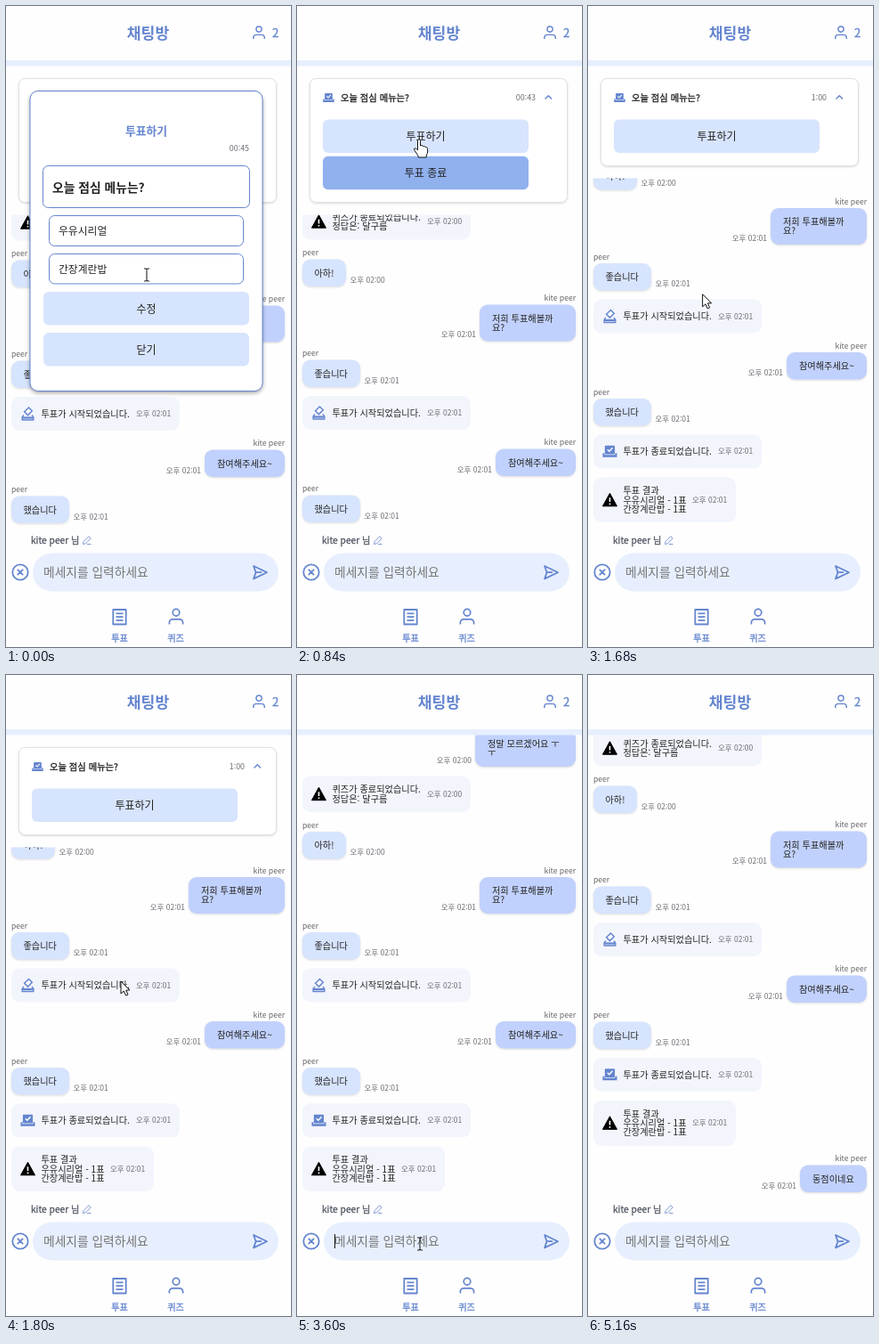
Write an HTML page that moves like this. It is 320 px wide and 720 px high and loops after 5.4 s.

```html
<!DOCTYPE html>
<html lang="ko">
<head>
<meta charset="utf-8">
<title>채팅방</title>
<style>
html, body { margin: 0; width: 100%; height: 100%; overflow: hidden; background: #fefefe; }
svg { display: block; width: 100vw; height: 100vh; font-family: "Noto Sans CJK KR", "Noto Sans CJK", "Noto Sans", sans-serif; }
.line { fill: none; stroke: #6485cf; stroke-width: 1.8; stroke-linejoin: round; }
.soft { filter: drop-shadow(0 1.5px 1px #0002); }
.lift { filter: drop-shadow(0 2px 2px #0005); }
</style>
</head>
<body>
<svg id="stage" viewBox="0 0 320 720"></svg>
<script>
const LOOP = 5400, STEP = 120;
const CLOSE = 480, END = 1320, HIDE = 2160, FOCUS = 3120, TYPE = 3780, SEND = 4140;
const BLUE = '#6485cf', PALE = '#d7e4fd', MID = '#90b0ee', MINE = '#c1d1fd', NOTE = '#f3f5fc', BAR = '#e7effe';
const INK = '#222', GREY = '#6c6c74';
const QUESTION = '오늘 점심 메뉴는?', REPLY = '동점이네요', ME = 'kite peer', PEER = 'peer';

// y is the vertical centre of the line; medium weight is thickened with a thin stroke
const text = (s, x, y, size, color = INK, anchor = 'start', weight = 400) =>
  `<text x="${x}" y="${y + size * .37}" font-size="${size}" fill="${color}" text-anchor="${anchor}" ` +
  (weight === 500 ? `stroke="${color}" stroke-width=".3"` : `font-weight="${weight}"`) + `>${s}</text>`;
const box = (x, y, r, b, radius, fill, extra = '') =>
  `<rect x="${x}" y="${y}" width="${r - x}" height="${b - y}" rx="${radius}" fill="${fill}" ${extra}/>`;
const outline = (x, y, r, b) => box(x, y, r, b, 6, '#fff', `stroke="${BLUE}"`);
const path = (d, extra = 'class="line"') => `<path d="${d}" ${extra}/>`;
const at = (x, y, body, scale = 1) => `<g transform="translate(${x} ${y}) scale(${scale})">${body}</g>`;
const button = (label, x, y, r, fill = PALE) =>
  box(x, y, r, y + 37.5, 6, fill) + text(label, (x + r) / 2, y + 19.3, 12, INK, 'middle');

const person = path('M8 9V7a4 4 0 0 0-4-4H-4a4 4 0 0 0-4 4v2M4-5a4 4 0 1 1-8 0a4 4 0 0 1 8 0z');
const icons = {
  open: path('M-4.5 1.5L-6.4 4V7H6.4V4L4.5 1.5', 'class="line" style="stroke-width:1.3"') +
    box(-6.4, 3.4, 6.4, 5.6, 0, BLUE) +
    path('M1-7L4.8-3.2L0 1.6L-3.8-2.2z', `fill="#fff" stroke="${BLUE}" stroke-width="1.5"`),
  done: path('M-8 2h2v2H6V2h2v4.5H-8z', `fill="${BLUE}"`) + box(-5.6, -6.5, 5.6, 3.2, 1, BLUE) +
    path('M-2.7-2L-.6 0L3-4', 'fill="none" stroke="#fff" stroke-width="1.4"'),
  warn: path('M0-7.5L8 7H-8z', 'stroke="#000" stroke-linejoin="round"') +
    path('M0-2.5V2.2M0 3.7V5.4', 'stroke="#fff" stroke-width="1.6"')
};

// kind, top, inner edge, time, lines, icon
const messages = [
  ['me', 62, 200, '02:00', ['정말 모르겠어요 ㅜ', 'ㅜ']],
  ['note', 113.5, 195, '02:00', ['퀴즈가 종료되었습니다.', '정답은: 달구름'], 'warn'],
  ['peer', 176, 55, '02:00', ['아하!']],
  ['me', 227, 205, '02:01', ['저희 투표해볼까', '요?']],
  ['peer', 289, 71, '02:01', ['좋습니다']],
  ['note', 329.5, 195, '02:01', ['투표가 시작되었습니다.'], 'open'],
  ['me', 389, 223, '02:01', ['참여해주세요~']],
  ['peer', 441, 71, '02:01', ['했습니다']],
  ['note', 481.3, 195, '02:01', ['투표가 종료되었습니다.'], 'done'],
  ['note', 529.5, 166, '02:01', ['투표 결과', '우유시리얼 - 1표', '간장계란밥 - 1표'], 'warn'],
  ['me', 602, 238, '02:01', [REPLY]]
];

function message([kind, y, edge, time, lines, icon]) {
  const me = kind === 'me', note = kind === 'note', n = lines.length;
  const h = note ? Math.max(38, 20 + 10.2 * n) : 30.5 + 10.4 * (n - 1);
  const mid = y + h / 2;
  const stamp = (x, cy, anchor) => text('오후 ' + time, x, cy, 8.5, GREY, anchor);
  const body = lines.map((s, i) =>
    text(s, note ? 39.5 : me ? edge + 14 : 19.5, mid + (i - (n - 1) / 2) * 10.3, 10.2)).join('');
  if (note) return box(6, y, edge, y + h, 9, NOTE) + at(24.5, mid, icons[icon]) + body + stamp(edge - 49, mid);
  return text(me ? ME : PEER, me ? 313 : 6, y - 7.5, 8.6, '#666', me ? 'end' : 'start') +
    box(me ? edge : 6, y, me ? 313 : edge, y + h, 9, me ? MINE : PALE, 'class="soft"') + body +
    stamp(me ? edge - 4 : edge + 4.5, y + h - 7.5, me ? 'end' : 'start');
}

const ease = (t, start, length) => {
  const p = Math.min(1, Math.max(0, (t - start) / length));
  return p * p * (3 - 2 * p);
};

function chat(t) {
  const top = t < END ? 234.5 : t < HIDE ? 193.5 : 67;
  const shift = (t < CLOSE ? 1 : 0) + 108.5 * (1 - ease(t, END - 60, 200)) - 51.5 * ease(t, SEND, 170);
  const shown = messages.slice(0, t < END ? 8 : t < SEND ? 10 : 11);
  return `<clipPath id="view"><rect y="${top}" width="320" height="${586 - top}"/></clipPath>` +
    `<g clip-path="url(#view)">${at(0, shift, shown.map(message).join(''))}</g>`;
}

function panel(t) {
  if (t >= HIDE) return '';
  const ended = t >= END;
  const clock = ended ? '1:00' : '00:' + (45 - Math.floor(t / 360));
  return box(14.5, 81.5, 303.5, ended ? 179.5 : 220.5, 7, '#fff', 'stroke="#dfe0e6" class="soft"') +
    at(35.5, 103, icons.done, .78) + text(QUESTION, 49, 103, 10.3, INK, 'start', 500) +
    text(clock, 268, 103, 8.9, GREY, 'end') + path('M278.5 104.5L282.3 100.7L286 104.5', 'class="line" style="stroke-width:1.4"') +
    button('투표하기', 29, 127.5, 260) + (ended ? '' : button('투표 종료', 29, 168.7, 260, MID));
}

function modal(t) {
  if (t >= CLOSE) return '';
  return box(27, 95.5, 288, 432.5, 9, '#fff', `stroke="${BLUE}" class="lift"`) +
    text('투표하기', 157.5, 140.5, 12.8, BLUE, 'middle', 700) +
    text('00:' + (45 - Math.floor(t / 360)), 273, 159.5, 8.9, GREY, 'end') +
    outline(41.5, 179.5, 273.5, 226.5) + text(QUESTION, 52, 203.5, 13.8, INK, 'start', 700) +
    outline(48.5, 235.5, 266.5, 269.5) + text('우유시리얼', 59, 253, 11.8) +
    outline(48.5, 278.5, 266.5, 312) + text('간장계란밥', 59, 295.5, 11.8) +
    button('수정', 42, 321, 273) + button('닫기', 42, 367, 273);
}

function footer(t) {
  const typing = t >= TYPE && t < SEND;
  const count = typing ? Math.min(5, 1 + Math.floor((t - TYPE) / 72)) : 0;
  const blink = (t - (t < SEND ? FOCUS : SEND)) % 380 < 190;
  const caretX = 42.5 + count * 12.65;
  return text(ME + ' 님', 28, 600, 10.2, '#555a66', 'start', 500) +
    path('M86.5 604.5l.7-3l5.6-5.8l2.4 2.3l-5.7 5.8zM91 604.5h4.5', 'class="line" style="stroke-width:1;stroke:#8299d4"') +
    path('M24.7 636a8.7 8.7 0 1 1-17.4 0a8.7 8.7 0 0 1 17.4 0zM12.8 632.8l6.4 6.4m0-6.4l-6.4 6.4') +
    box(30, 614.5, 306, 657.5, 21.5, BAR) +
    (count ? text(REPLY.slice(0, count), 42, 636, 13.75) : text('메세지를 입력하세요', 42, 636, 13.75, '#757575')) +
    (t >= FOCUS && (typing || blink) ? path(`M${caretX} 628V644`, 'stroke="#111"') : '') +
    path('M278 629L293 636.2L278 643.4L280.5 636.2zM280.5 636.2h6.5') +
    path('M120.3 678h14.4v16.5h-14.4zM123.5 682.3h8M123.5 686.2h8M123.5 690.1h8') +
    at(191, 686, person, .95) +
    text('투표', 127.5, 710, 10.2, BLUE, 'middle', 500) + text('퀴즈', 190.5, 710, 10.2, BLUE, 'middle', 500);
}

const pointers = {
  arrow: path('M0 0V14L3.3 11L5.5 16L8 15L5.8 10H10z', 'fill="#fff" stroke="#111"'),
  beam: path('M-3-7H-1L0-6L1-7H3M0-6V6M-3 7H-1L0 6L1 7H3', 'fill="none" stroke="#222" stroke-width="1.1"'),
  hand: path('M-1.5 1.2a1.5 1.5 0 0 1 3 0V7c2-1 3 0 3 .8c1.5-.7 2.6 0 2.8 1c1.4-.4 2.3.3 2.3 1.6V14c0 2-1.5 3-1.5 6H-.5C-1 17-5 13-5.5 11c0-1.6 2-1.5 4 .8z',
    'fill="#fff" stroke="#111"')
};
// time, x, y
const track = [[0, 158, 302], [360, 157, 386], [480, 157, 386], [840, 137, 150], [1080, 126, 184], [1260, 126, 184],
  [1800, 129, 344], [2040, 128, 686], [2520, 128, 686], [3000, 138, 639], [4700, 138, 639], [5040, 138, 745]];

function pointer(t) {
  const i = track.findIndex(k => k[0] > t);
  if (i < 0) return '';
  const [a, b] = [track[i - 1], track[i]], p = ease(t, a[0], b[0] - a[0]);
  const x = a[1] + (b[1] - a[1]) * p, y = a[2] + (b[2] - a[2]) * p;
  const over = (top, bottom) => y >= top && y <= bottom;
  let kind = 'arrow';
  if (over(615, 657) || t < CLOSE && over(278, 312)) kind = 'beam';
  else if (over(675, 715) || (t < CLOSE ? over(321, 358) || over(367, 404)
    : t < HIDE && (over(127, 165) || t < END && over(169, 206)))) kind = 'hand';
  return at(x, y, pointers[kind]);
}

const header = box(0, 0, 320, 61, 0, '#fefefe') + box(0, 61, 320, 67.5, 0, BAR) +
  text('채팅방', 159.5, 30.5, 17.2, BLUE, 'middle', 700) +
  at(284, 30, person, .78) + text('2', 299, 30.5, 13, BLUE, 'start', 500);
const stage = document.getElementById('stage');
let drawn = -1;

function tick(now) {
  const t = Math.floor(now % LOOP / STEP) * STEP;
  if (t !== drawn) {
    drawn = t;
    stage.innerHTML = chat(t) + header + panel(t) + footer(t) + modal(t) + pointer(t);
  }
  requestAnimationFrame(tick);
}
tick(performance.now());
</script>
</body>
</html>
```
